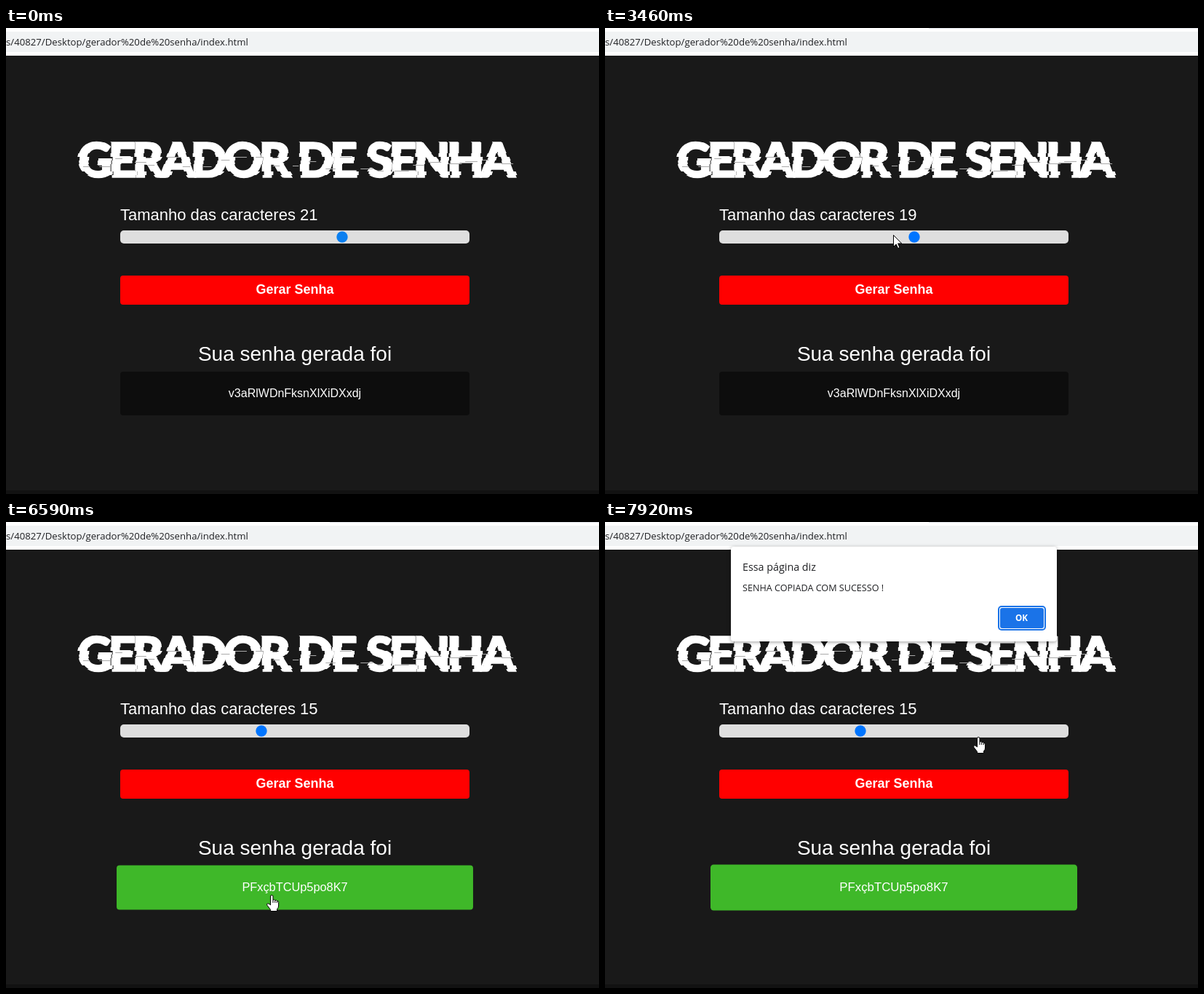
These frames come from a looping animation (815 px wide and 640 px high, 8 s). An HTML page with a canvas:

```html
<!DOCTYPE html>
<html lang="pt">
<head>
<meta charset="utf-8">
<title>Gerador de senha</title>
<style>
html, body { margin: 0; width: 100%; height: 100%; overflow: hidden; background: #191919; }
canvas { display: block; }
</style>
</head>
<body>
<canvas id="stage" width="815" height="640"></canvas>
<script>
const W = 815, H = 640, LOOP = 8000, STEP = 67;
const DARK = '#191919', RED = '#ff0000', GREEN = '#3fb829', BLUE = '#1a73e8';
const ARIAL = '"Liberation Sans", Arial, sans-serif';
const UI = '"Open Sans", "Noto Sans", sans-serif';

// Key times of the interaction
const PICK = 2460, REPICK = 3740, GENERATE = 5360, RESULT = 5500;
const HOVER = 6450, COPY = 7120, ALERT = 7320;
const CLICKS = [PICK, 3190, REPICK, GENERATE, COPY];

// Pointer path: from, to, end x, end y
const ENTRY = { x: 811, y: 665 };
const MOVES = [
  [510, 840, 445, 416],
  [1100, 1300, 440, 317],
  [1560, 1920, 416, 277],
  [3460, 3940, 346, 302],
  [4220, 4560, 364, 372],
  [6310, 6520, 363, 512],
  [7850, 7920, 511, 295]
];

let ctx = document.getElementById('stage').getContext('2d');

// Draws once into a separate canvas
function layer(draw) {
  const canvas = document.createElement('canvas');
  canvas.width = W;
  canvas.height = H;
  const main = ctx;
  ctx = canvas.getContext('2d');
  draw();
  ctx = main;
  return canvas;
}

function random(seed) {
  return () => (seed = (seed * 16807) % 2147483647) / 2147483647;
}

function rect(x, y, w, h, color) {
  ctx.fillStyle = color;
  ctx.fillRect(x, y, w, h);
}

function box(x, y, w, h, r, color) {
  ctx.fillStyle = color;
  ctx.beginPath();
  ctx.roundRect(x, y, w, h, r);
  ctx.fill();
}

function disc(x, y, r, color) {
  ctx.fillStyle = color;
  ctx.beginPath();
  ctx.arc(x, y, r, 0, Math.PI * 2);
  ctx.fill();
}

function text(str, x, y, font, color = '#fff', align = 'left') {
  ctx.font = font;
  ctx.fillStyle = color;
  ctx.textAlign = align;
  ctx.fillText(str, x, y);
}

function drawBrowser() {
  rect(0, 0, W, H, DARK);
  rect(0, 635, W, 5, '#121212');
  rect(0, 0, W, 38, '#fff');
  rect(445, 0, W - 445, 1, '#dee1e6');
  rect(0, 5, W, 28, '#f1f3f4');
  text('s/40827/Desktop/gerador%20de%20senha/index.html', 0, 24, '13.2px ' + UI, '#202124');
}

function drawWords(dx) {
  ctx.letterSpacing = '-5px';
  ctx.lineWidth = 1.6;
  ctx.strokeStyle = '#fff';
  for (const [word, x] of [['GERADOR', 99], ['DE', 401], ['SENHA', 496]]) {
    text(word, x + dx, 205, '900 66px Lato, "Open Sans", sans-serif');
    ctx.strokeText(word, x + dx, 205);
  }
}

// Title cut into thin bands, each nudged sideways, plus stray lines
function drawTitle() {
  const rnd = random(77);
  for (let y = 152; y < 212; y += 5) {
    ctx.save();
    ctx.beginPath();
    ctx.rect(0, y, W, 5);
    ctx.clip();
    drawWords(Math.round(rnd() * 4 - 2));
    ctx.restore();
  }
  for (let x = 98; x < 680; x += 24) {
    rect(x + rnd() * 8, 177 + Math.floor(rnd() * 20), 8 + rnd() * 12, 1, '#aaa');
  }
}

function drawDialog() {
  ctx.shadowColor = 'rgba(0,0,0,0.4)';
  ctx.shadowBlur = 5;
  ctx.shadowOffsetY = 1;
  box(173, 34, 448, 130, 4, '#fff');
  ctx.shadowColor = 'transparent';
  text('Essa página diz', 189, 67, '14.3px ' + UI, '#202124');
  text('SENHA COPIADA COM SUCESSO !', 189, 95, '12.6px ' + UI, '#202124');
  box(540, 115, 66, 34, 5, BLUE);
  box(542, 117, 62, 30, 3, '#fff');
  box(543, 118, 60, 28, 3, BLUE);
  text('OK', 572.5, 136, 'bold 11.7px ' + UI, '#fff', 'center');
}

const page = layer(() => { drawBrowser(); drawTitle(); });
const dialog = layer(drawDialog);

function pointerAt(t) {
  let { x, y } = ENTRY;
  for (const [from, to, endX, endY] of MOVES) {
    if (t < from) break;
    const n = Math.round((to - from) / STEP) + 1;
    const step = Math.min(n, Math.floor((t - from) / STEP) + 1);
    const p = 1 - (1 - step / n) ** 2.5;
    x += (endX - x) * p;
    y += (endY - y) * p;
  }
  return { x: Math.round(x), y: Math.round(y) };
}

function drawForm(t, onButton) {
  const size = t < PICK ? 21 : t < REPICK ? 19 : 15;
  text('Tamanho das caracteres ' + size, 157, 264, '22px ' + ARIAL);
  box(157, 278, 480, 18, 5, '#dedede');
  disc(351 + (size - 15) * 18.5, 287, 7.7, t < PICK ? '#0a7ff0' : '#0075ff');

  box(157, 340, 480, 40, 4, onButton ? GREEN : RED);
  text('Gerar Senha', 397, 365, 'bold 18px ' + ARIAL, '#fff', 'center');
  text('Sua senha gerada foi', 397, 457, '28px ' + ARIAL, '#fff', 'center');

  const p = Math.min(1, Math.max(0, (t - HOVER) / 600));
  const grow = 1 + 0.05 * (1 - (1 - p) ** 2);
  ctx.save();
  ctx.translate(397, 502);
  ctx.scale(grow, grow);
  box(-240, -30, 480, 60, 4, t >= HOVER ? GREEN : '#0d0d0d');
  text(t < RESULT ? 'v3aRlWDnFksnXlXiDXxdj' : 'PFxçbTCUp5po8K7', 0, 5, '16px ' + ARIAL, '#fff', 'center');
  ctx.restore();
}

function drawAlert(t) {
  if (t < ALERT) return;
  const left = Math.max(0, 1 - Math.floor((t - ALERT) / STEP) / 3) ** 2;
  ctx.globalAlpha = 1 - 0.65 * left;
  ctx.drawImage(dialog, 0, Math.round(-17 * left));
  ctx.globalAlpha = 1;
}

const ARROW = new Path2D('M.5 .5V16.5L4.2 13L6.7 18.6L9 17.6L6.6 12H11.7Z');
const HAND = new Path2D('M.5 2Q.5 .5 2.2 .5T4 2V7Q6 6 7 7.6Q9 7 9.6 8.6Q11.6 8 11.6 10.2' +
  'V15Q11.6 18 9.6 19.5V22.5H.6V20.5L-4 14.5Q-5 12.6-3.6 12Q-2 11.4-.6 13.2L.5 14Z');
const FINGERS = new Path2D('M4 7V11M6.8 8V11M9.4 9V11');

function drawPointer(t, { x, y }, hand) {
  if (t < MOVES[0][0]) return;
  if (CLICKS.some(c => t >= c && t < c + 75)) disc(x, y, 12, 'rgba(255,255,0,0.47)');
  const shape = hand ? HAND : ARROW;
  ctx.save();
  ctx.translate(x, y);
  ctx.fillStyle = '#fff';
  ctx.strokeStyle = '#000';
  ctx.fill(shape);
  ctx.stroke(shape);
  if (hand) ctx.stroke(FINGERS);
  ctx.restore();
}

const begin = performance.now();

function frame() {
  const t = (performance.now() - begin) % LOOP;
  const pointer = pointerAt(t);
  const onButton = t < HOVER && pointer.y >= 340 && pointer.y < 380;
  ctx.drawImage(page, 0, 0);
  drawForm(t, onButton);
  drawAlert(t);
  drawPointer(t, pointer, onButton || t >= HOVER);
  requestAnimationFrame(frame);
}
frame();
</script>
</body>
</html>
```
